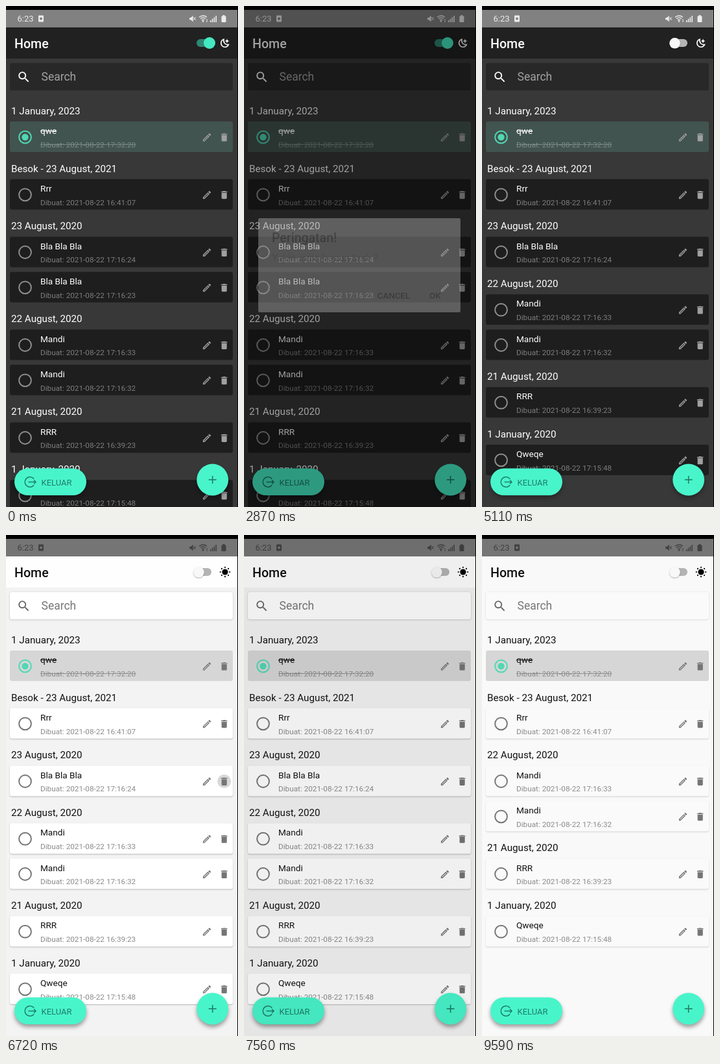
An HTML page with a canvas that plays this animation: 358x772 px, repeating every 9.66 s.

```html
<!DOCTYPE html>
<html lang="id">
<head>
<meta charset="utf-8">
<style>
html, body { margin: 0; width: 100%; height: 100%; overflow: hidden; background: #000; }
canvas { display: block; width: 358px; height: 772px; }
</style>
</head>
<body>
<canvas id="stage"></canvas>
<script>
const W = 358, H = 772, LOOP = 9660, STEP = 70;
const canvas = document.getElementById('stage');
const ctx = canvas.getContext('2d');
const dpr = window.devicePixelRatio || 1;
canvas.width = W * dpr;
canvas.height = H * dpr;

const DARK = {
  status: '#818181', statusInk: '#ececec', bar: '#212121', bg: '#383838', card: '#1e1e1e',
  search: '#282828', done: '#42544f', ink: '#fff', sub: '#7d7d7d', hint: '#a2a2a2',
  icon: '#a0a0a0', ring: '#8e8e8e', ripple: 'rgba(255,255,255,.2)', lens: '#fff'
};
const LIGHT = {
  status: '#757575', statusInk: '#414141', bar: '#fefefe', bg: '#f3f3f3', card: '#fff',
  search: '#fff', done: '#d6d6d6', ink: '#111', sub: '#8c8c8c', hint: '#777',
  icon: '#757575', ring: '#777', ripple: '#d8d8d8', lens: '#666', shadow: 'rgba(0,0,0,.25)'
};
const PALE = { ...LIGHT, bar: '#f9f9f9', bg: '#f9f9f9', card: '#fafafa', search: '#fafafa', shadow: 'rgba(0,0,0,.17)' };
const MINT = '#48f5cb', MINT_INK = '#1f7d68';

// Item: title, date, start of shrinking, time of removal
const SECTIONS = [
  ['1 January, 2023', [['qwe', '2021-08-22 17:32:20']]],
  ['Besok - 23 August, 2021', [['Rrr', '2021-08-22 16:41:07']]],
  ['23 August, 2020', [
    ['Bla Bla Bla', '2021-08-22 17:16:24', 8226, 8890],
    ['Bla Bla Bla', '2021-08-22 17:16:23', 3886, 4550]]],
  ['22 August, 2020', [['Mandi', '2021-08-22 17:16:33'], ['Mandi', '2021-08-22 17:16:32']]],
  ['21 August, 2020', [['RRR', '2021-08-22 16:39:23']]],
  ['1 January, 2020', [['Qweqe', '2021-08-22 17:15:48']]]
];

// Icons on a 24 unit grid
const PENCIL = new Path2D('M14.06 9.02l.92.92L5.92 19H5v-.92l9.06-9.06M17.66 3c-.25 0-.51.1-.7.29l-1.83 1.83 3.75 3.75 1.83-1.83c.39-.39.39-1.02 0-1.41l-2.34-2.34c-.2-.2-.45-.29-.71-.29zm-3.6 3.19L3 17.25V21h3.75L17.81 9.94l-3.75-3.75z');
const TRASH = new Path2D('M6 19c0 1.1.9 2 2 2h8c1.1 0 2-.9 2-2V7H6v12zM19 4h-3.5l-1-1h-5l-1 1H5v2h14V4z');
const LENS = new Path2D('M15.5 14h-.79l-.28-.27A6.47 6.47 0 0016 9.5 6.5 6.5 0 109.5 16c1.61 0 3.09-.59 4.23-1.57l.27.28v.79l5 4.99L20.49 19l-4.99-5zm-6 0C7.01 14 5 11.99 5 9.5S7.01 5 9.5 5 14 7.01 14 9.5 11.99 14 9.5 14z');
const MOON = new Path2D('M10 4A8.6 8.6 0 1 0 20.5 15.5A9 9 0 0 1 10 4Z');
const STAR = new Path2D('M17 2l1.4 3.6L22 7l-3.6 1.4L17 12l-1.4-3.6L12 7l3.6-1.4z');
const MUTE = new Path2D('M3 9h4l6-6v18l-6-6H3zM15 8l7 8h-2l-7-8zM20 8h2l-7 8h-2z');

const clamp = v => Math.max(0, Math.min(1, v));
const ramp = (t, start, length) => clamp((t - start) / length);
const between = (t, a, b) => t >= a && t < b;

function text(s, x, y, size, color, weight = 400) {
  ctx.font = `${weight} ${size}px Roboto, sans-serif`;
  ctx.fillStyle = color;
  ctx.fillText(s, x, y);
  return ctx.measureText(s).width;
}
function rect(x, y, w, h, color, r = 0) {
  ctx.fillStyle = color;
  ctx.beginPath();
  ctx.roundRect(x, y, w, h, r);
  ctx.fill();
}
function disc(x, y, r, color) {
  ctx.fillStyle = color;
  ctx.beginPath();
  ctx.arc(x, y, r, 0, 7);
  ctx.fill();
}
function arc(x, y, r, color, width, from = 0, to = Math.PI * 2) {
  ctx.strokeStyle = color;
  ctx.lineWidth = width;
  ctx.beginPath();
  ctx.arc(x, y, r, from, to);
  ctx.stroke();
}
function line(color, width, ...pts) {
  ctx.strokeStyle = color;
  ctx.lineWidth = width;
  ctx.beginPath();
  for (let i = 0; i < pts.length; i += 2) ctx.lineTo(pts[i], pts[i + 1]);
  ctx.stroke();
}
function icon(path, x, y, size, color, stroke) {
  ctx.save();
  ctx.translate(x, y);
  ctx.scale(size / 24, size / 24);
  ctx.translate(-12, -12);
  ctx.fillStyle = ctx.strokeStyle = color;
  ctx.lineWidth = stroke;
  if (stroke) ctx.stroke(path); else ctx.fill(path);
  ctx.restore();
}
function shaded(color, blur, dy, draw) {
  ctx.save();
  if (color) {
    ctx.shadowColor = color;
    ctx.shadowBlur = blur * dpr;
    ctx.shadowOffsetY = dy * dpr;
  }
  draw();
  ctx.restore();
}

function statusBar(c) {
  const k = c.statusInk;
  rect(0, 6, 357, 27, c.status);
  text('6:23', 17.5, 24, 13, k);
  rect(50, 14.5, 8, 10, k, 1);
  disc(54, 19.5, 2, c.status);
  icon(MUTE, 288, 19.5, 13, k);
  for (const r of [3, 6, 9]) arc(304, 24, r, k, 1.4, -2.3, -0.85);
  disc(304, 23.5, 1.3, k);
  line(k, 1, 310, 20, 310, 25);
  for (let i = 0; i < 4; i++) rect(315 + i * 2.8, 22 - i * 2.3, 1.6, 3 + i * 2.3, k);
  rect(332.5, 15.5, 7, 9.5, k, 1);
  rect(334.5, 14, 3, 2, k);
}

function header(c, t) {
  const on = t < 5110;
  rect(0, 33, 357, 48, c.bar);
  text('Home', 13, 65, 19.6, c.ink, 500);
  if (on) {
    rect(294, 51, 26, 12, '#2e8772', 6);
    disc(314, 57, 9, '#44e9c1');
  } else {
    rect(291, 51, 26, 12, '#b4b4b4', 6);
    shaded('rgba(0,0,0,.3)', 2, 1, () => disc(297.5, 57.3, 8.3, '#f8f8f8'));
  }
  if (c === DARK) {
    icon(MOON, 337.5, 57, 17, c.ink, 2.2);
    icon(STAR, 337.5, 57.5, 17, c.ink);
  } else {
    disc(338, 57, 4.6, '#000');
    for (let i = 0; i < 8; i++) {
      const a = i * Math.PI / 4;
      disc(338 + 7.2 * Math.cos(a), 57 + 7.2 * Math.sin(a), 1.1, '#000');
    }
  }
}

function search(c) {
  shaded(c.shadow, 2.5, .5, () => rect(6, 88, 344, 42, c.search, 3));
  icon(LENS, 27.5, 109.5, 22, c.lens);
  text('Search', 54.5, 115, 17.5, c.hint);
}

function card(c, [title, date], y, done, ripple) {
  shaded(done ? 0 : c.shadow, 2, 1, () => rect(6, y, 344, 47, done ? c.done : c.card, 3));
  const mid = y + 24;
  arc(29.5, mid, 9.4, done ? '#51d8b3' : c.ring, 2);
  if (done) disc(29.5, mid, 5.2, '#51d8b3');
  const w1 = text(title, 53, y + 19, 13.6, c.ink);
  const sub = done && c === DARK ? '#7c8c87' : c.sub;
  const w2 = text('Dibuat: ' + date, 53, y + 39.7, 11.75, sub);
  if (done) {
    line(c.ink, 1, 53, y + 14.5, 53 + w1, y + 14.5);
    line(sub, 1, 53, y + 35.5, 53 + w2, y + 35.5);
  }
  if (ripple) disc(336.7, mid, 10.5, c.ripple);
  icon(PENCIL, 310, mid + .3, 16.3, c.icon);
  icon(TRASH, 336.7, mid + .3, 16.3, c.icon);
}

function shrink(t, start) {
  const p = ramp(t, start, 300);
  return p < .5 ? 1 - 2 * p * p : 2 * (1 - p) ** 2;
}

function list(c, t) {
  let y = 143.7;
  for (const [name, all] of SECTIONS) {
    const items = all.filter(item => !(t >= item[3]));
    if (!items.length) continue;
    text(name, 8, y + 23.3, 15.2, c.ink);
    y += 34.4;
    for (const item of items) {
      const s = item[2] ? shrink(t, item[2]) : 1;
      const pressed = item[2] === 3886 ? between(t, 2100, 2450) : item[2] && between(t, 6720, 7070);
      if (s > 0) {
        ctx.save();
        ctx.translate(178, y + 27);
        ctx.scale(s, s);
        ctx.translate(-178, -y - 27);
        card(c, item, y, item[0] === 'qwe', pressed);
        ctx.restore();
      }
      y += 54.3;
    }
  }
}

// Glow and scrollbar when the list is pulled past its end
function overscroll(t) {
  const a = ramp(t, 1330, 140) * (1 - ramp(t, 1610, 350));
  if (!a) return;
  ctx.globalAlpha = a;
  ctx.fillStyle = 'rgba(255,255,255,.16)';
  ctx.beginPath();
  ctx.ellipse(225, 774, 170, 20 * a, 0, 0, 7);
  ctx.fill();
  rect(354, 137, 3, 631, 'rgba(0,0,0,.2)');
  ctx.globalAlpha = 1;
}

function buttons(c) {
  const shade = c === DARK ? 'rgba(0,0,0,.3)' : 'rgba(0,0,0,.38)';
  shaded(shade, 6, 4, () => rect(13, 712.5, 111, 41.5, MINT, 21));
  shaded(shade, 6, 4, () => disc(318.7, 730, 24.4, MINT));
  arc(37, 733.5, 7.8, MINT_INK, 1.5, .65, 5.63);
  line(MINT_INK, 1.5, 34.5, 733.5, 46, 733.5);
  line(MINT_INK, 1.5, 43, 730.5, 46, 733.5, 43, 736.5);
  text('KELUAR', 54.5, 738.7, 13, MINT_INK);
  line(MINT_INK, 1.6, 312.7, 730, 324.7, 730);
  line(MINT_INK, 1.6, 318.7, 724, 318.7, 736);
}

function dialog(t, open, close, length) {
  if (!between(t, open, close + length)) return;
  const dim = .6 * ramp(t, open, 220) * (1 - ramp(t, close, length));
  rect(0, 6, 357, 766, `rgba(0,0,0,${dim})`);
  const alpha = ramp(t, open, 150) * (1 - ramp(t, close, length * .52));
  if (!alpha) return;
  ctx.globalAlpha = alpha;
  rect(22, 327, 312, 145, '#fff', 2);
  text('Peringatan!', 43, 364, 19.5, '#000', 500);
  text('Yakin ingin hapus task ?', 43, 393, 15.4, '#333');
  text('CANCEL', 205.5, 451, 13.4, '#000', 500);
  text('OK', 286, 451, 13.4, '#000', 500);
  ctx.globalAlpha = 1;
}

function draw(t) {
  const c = t < 5390 ? DARK : t < 7630 ? LIGHT : PALE;
  ctx.setTransform(dpr, 0, 0, dpr, 0, 0);
  rect(0, 0, W, H, '#000');
  rect(0, 6, 357, 766, c.bg);
  list(c, t);
  overscroll(t);
  statusBar(c);
  header(c, t);
  search(c);
  buttons(c);
  dialog(t, 2120, 2787, 220);
  dialog(t, 6740, 7425, 150);
}

const start = performance.now();
function tick() {
  const t = (performance.now() - start) % LOOP;
  draw(Math.floor(t / STEP) * STEP);
  requestAnimationFrame(tick);
}
tick();
</script>
</body>
</html>
```
